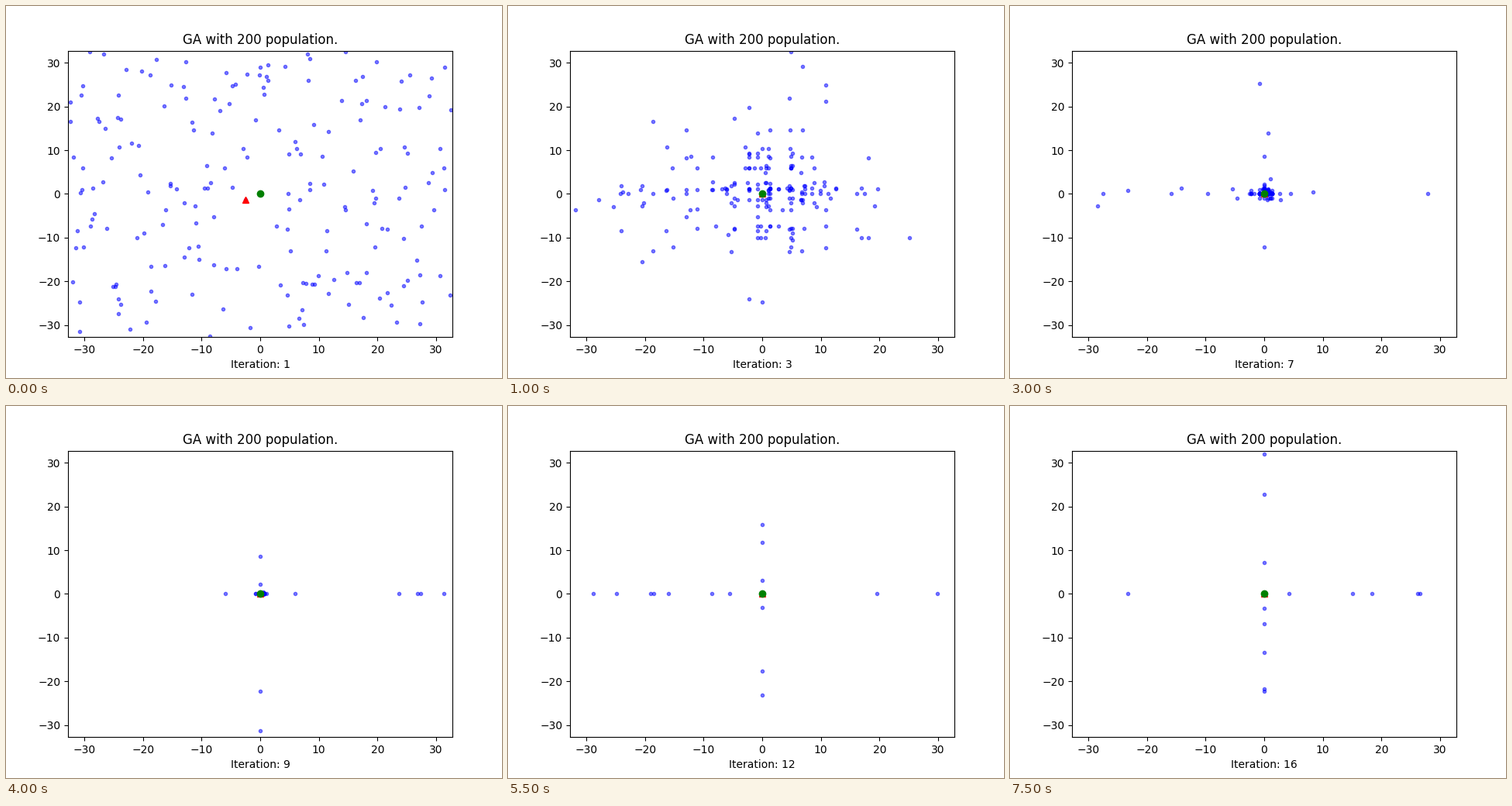
A matplotlib script for the animation above (8 s loop, 640 px wide and 480 px high).

```python
import numpy as np
import matplotlib.pyplot as plt
from matplotlib.animation import FuncAnimation

SIZE = 200
GENERATIONS = 16
LIMIT = 32.768
MUTATION = 0.07
SPREAD = np.array([45, 32])   # starting selection width for x and y
COOLING = 0.56                # how fast selection narrows

# Founders whose genes lie near the optimum; the last one is the first best.
FOUNDERS = [(0, 29), (4.8, 0), (-0.75, 17), (1.1, 26.8), (-9, 1.3),
            (10.9, 2.2), (19.7, -1), (-12.9, -2), (-6.1, 5.9), (-2.5, -1.4)]

plt.rcParams["text.kerning_factor"] = 6
rng = np.random.default_rng(7)


def distance(pop):
    return np.hypot(*pop.T)


def first_generation():
    pop = rng.uniform(-LIMIT, LIMIT, (2 * SIZE, 2))
    pop = pop[distance(pop) > 4][:SIZE - len(FOUNDERS)]
    return np.vstack([pop, FOUNDERS])


def select(genes, width):
    """Draw genes, favouring those close to zero."""
    weight = np.exp(-np.abs(genes) / width)
    return rng.choice(genes, SIZE, p=weight / weight.sum())


def next_generation(pop, k):
    """Cross x and y genes, mutate one gene of a few children, keep the elite."""
    widths = SPREAD * COOLING ** k
    kids = np.column_stack([select(g, w) for g, w in zip(pop.T, widths)])
    mutants = np.flatnonzero(rng.random(SIZE) < MUTATION)
    axis = rng.integers(0, 2, len(mutants))
    kids[mutants, axis] = rng.uniform(-LIMIT, LIMIT, len(mutants))
    kids[0] = [g[np.abs(g).argmin()] for g in pop.T]
    return kids


def evolve():
    pops = [first_generation()]
    for k in range(1, GENERATIONS):
        pops.append(next_generation(pops[-1], k))
    return pops


POPS = evolve()

fig, ax = plt.subplots(figsize=(6.4, 4.8), dpi=100)
ax.set(xlim=(-LIMIT, LIMIT), ylim=(-LIMIT, LIMIT),
       title=f"GA with {SIZE} population.")
dots, = ax.plot([], [], "b.", alpha=0.5)
best, = ax.plot([], [], "r^")
ax.plot([0], [0], "go")


def update(i):
    pop = POPS[i]
    dots.set_data(*pop.T)
    best.set_data(*pop[[distance(pop).argmin()]].T)
    ax.set_xlabel(f"Iteration: {i + 1}")
    return dots, best


anim = FuncAnimation(fig, update, frames=GENERATIONS, interval=500,
                     init_func=lambda: update(0), repeat=True, repeat_delay=0)
plt.show()
```
